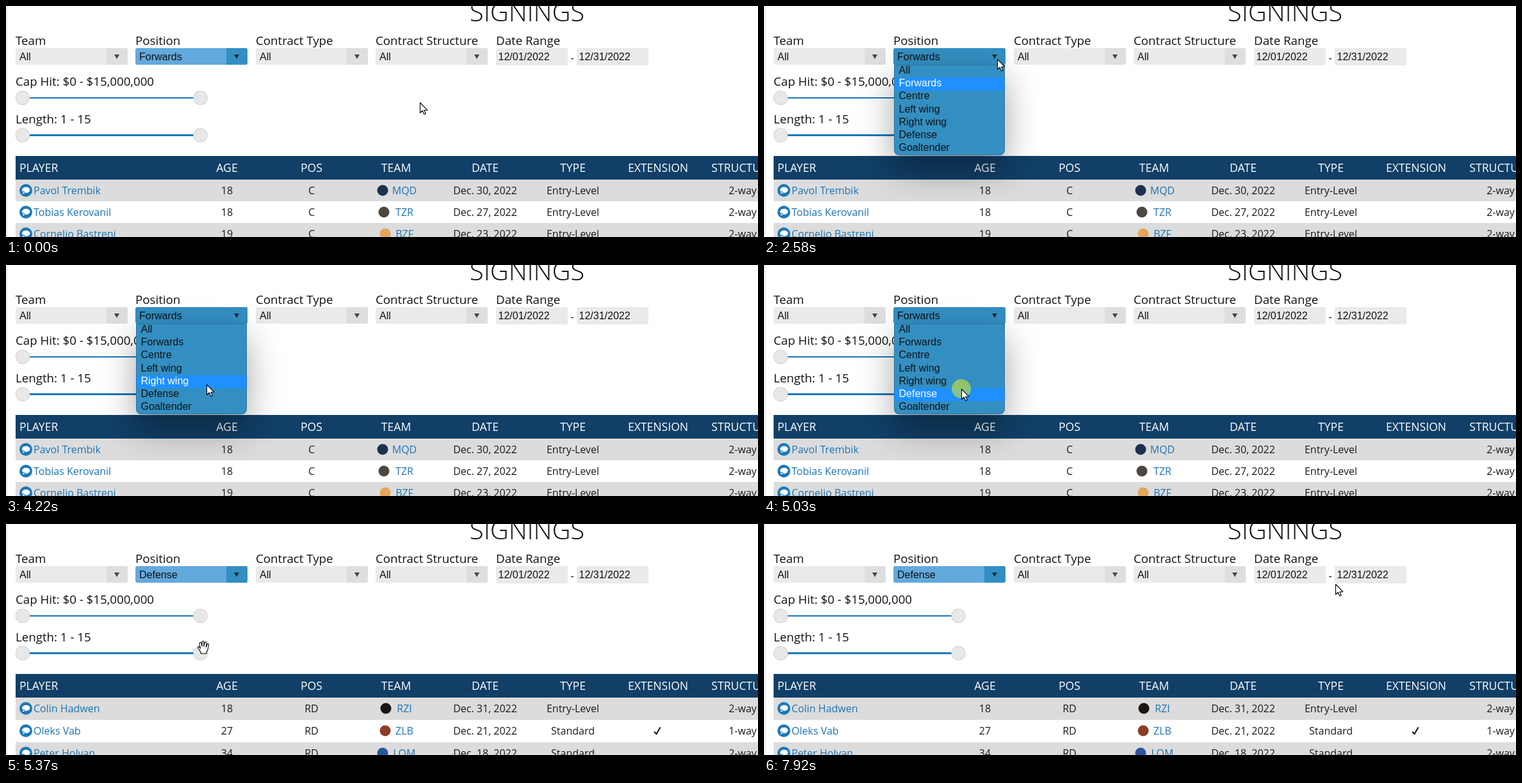
An HTML page with a canvas that plays this animation: 1174 by 362 pixels, repeating every 8 s.

```html
<!DOCTYPE html>
<html lang="en">
<head>
<meta charset="utf-8">
<title>Signings</title>
<style>
  html, body { margin: 0; width: 100%; height: 100%; overflow: hidden; background: #fff; }
  canvas { display: block; }
</style>
</head>
<body>
<canvas id="stage" width="1174" height="362"></canvas>
<script>
const ctx = document.getElementById('stage').getContext('2d');
const W = 1174, H = 362, LOOP = 8000;
const SANS = '"Open Sans", sans-serif';
const FORM = '16px "Liberation Sans", Arial, sans-serif';
const LABEL = '18.72px ' + SANS;
const CELL = '16px ' + SANS;
const HEAD = '17.6px ' + SANS;
const BLUE = '#1b78b8', LINK = '#1c74b3', INK = '#111';

const OPEN = 1920, REPAINT = 2580, PRESS = 5030, CLOSE = 5170, LOADED = 5310, LEAVE = 5900;
const OPTIONS = ['All', 'Forwards', 'Centre', 'Left wing', 'Right wing', 'Defense', 'Goaltender'];
const HOVERS = [[OPEN, 1], [3050, 0], [3530, 1], [3670, 2], [3810, 3], [4010, 4], [4420, 5]];

const COLUMNS = [['AGE', 345], ['POS', 477], ['TEAM', 609], ['DATE', 748],
  ['TYPE', 885], ['EXTENSION', 1018], ['STRUCTURE', 1150]];

const player = (name, age, pos, team, color, logoX, date, type, way, extended) =>
  ({ name, age, pos, team, color, logoX, date, type, way, extended });

const FORWARDS = [
  player('Pavol Trembik', '18', 'C', 'MQD', '#1d3050', 588, 'Dec. 30, 2022', 'Entry-Level', '2-way'),
  player('Tobias Kerovanil', '18', 'C', 'TZR', '#4d4740', 590, 'Dec. 27, 2022', 'Entry-Level', '2-way'),
  player('Cornelio Bastreni', '19', 'C', 'BZF', '#e5a55a', 592, 'Dec. 23, 2022', 'Entry-Level', '2-way')
];
const DEFENSE = [
  player('Colin Hadwen', '18', 'RD', 'RZI', '#1a1614', 593, 'Dec. 31, 2022', 'Entry-Level', '2-way'),
  player('Oleks Vab', '27', 'RD', 'ZLB', '#8c3d25', 592, 'Dec. 21, 2022', 'Standard', '1-way', true),
  player('Peter Holvan', '34', 'RD', 'LQM', '#29589b', 588, 'Dec. 18, 2022', 'Standard', '2-way')
];

const easeIn = p => u => u ** p;
const easeOut = p => u => 1 - (1 - u) ** p;
// Each move: start, end, steps, target x, target y, easing, optional easing for y.
const START = [646, 151];
const MOVES = [
  [330, 1090, 12, 440, 129, easeIn(1.4)],
  [1160, 1580, 7, 364, 84, easeOut(2)],
  [1650, 1650, 1, 364, 83, easeIn(1)],
  [2980, 3740, 12, 335, 153, easeIn(0.9)],
  [3810, 4220, 7, 313, 187, easeIn(0.6)],
  [4290, 4560, 4, 308, 193, easeOut(1.5)],
  [4630, 4630, 1, 308, 194, easeIn(1)],
  [5900, 6670, 12, 638, 172, easeIn(1.56), easeIn(6)],
  [6740, 7510, 12, 881, 101, easeOut(2)],
  [7580, 7720, 3, 892, 95, easeOut(1.5)],
  [7920, 7920, 1, 892, 94, easeIn(1)]
];

function pointer(t) {
  let [x, y] = START;
  for (const [start, end, steps, toX, toY, ease, easeY = ease] of MOVES) {
    if (t < start) break;
    const done = end > start ? Math.floor((t - start) / (end - start) * (steps - 1) + 0.01) + 1 : steps;
    const u = Math.min(1, done / steps);
    x += (toX - x) * ease(u);
    y += (toY - y) * easeY(u);
  }
  return [Math.round(x), Math.round(y)];
}

const ramp = (t, a, b) => Math.min(1, Math.max(0, (t - a) / (b - a)));

function mix(a, b, u) {
  return `rgb(${a.map((v, i) => Math.round(v + (b[i] - v) * u)).join(',')})`;
}

function rect(x, y, w, h, color) {
  ctx.fillStyle = color;
  ctx.fillRect(x, y, w, h);
}

function rounded(x, y, w, h, radius, color) {
  ctx.beginPath();
  ctx.roundRect(x, y, w, h, radius);
  ctx.fillStyle = color;
  ctx.fill();
}

function disc(x, y, r, color) {
  ctx.beginPath();
  ctx.arc(x, y, r, 0, Math.PI * 2);
  ctx.fillStyle = color;
  ctx.fill();
}

function text(str, x, y, font, color = INK, align = 'left') {
  ctx.font = font;
  ctx.textAlign = align;
  ctx.fillStyle = color;
  ctx.fillText(str, x, y);
}

function select(x, label, value, color = '#eaeaea', button = '#dedede', arrow = '#444') {
  text(label, x, 61, LABEL);
  rounded(x, 66, 175, 26, 3, color);
  rounded(x + 142, 66, 33, 26, [0, 3, 3, 0], button);
  text(value, x + 6, 85, FORM);
  ctx.beginPath();
  ctx.moveTo(x + 154, 76);
  ctx.lineTo(x + 162, 76);
  ctx.lineTo(x + 158, 83);
  ctx.fillStyle = arrow;
  ctx.fill();
}

function dateBox(x, value) {
  rounded(x, 66, 112, 27, 3, '#eaeaea');
  text(value, x + 3.5, 85, FORM);
}

function slider(label, baseline, y, weight) {
  text(label, 15, baseline, LABEL);
  rect(36, y - weight / 2, 258, weight, BLUE);
  for (const x of [26, 303.5]) {
    disc(x, y, 11.2, '#d3d3d3');
    disc(x, y, 10.2, '#e8e8e8');
  }
}

function filters(t) {
  const hover = t < 3000 ? ramp(t, 1440, 1720) : 1 - ramp(t, 5130, 5370);
  const fill = mix([98, 169, 221], [51, 143, 194], hover);
  select(15, 'Team', 'All');
  select(202, 'Position', t < CLOSE ? 'Forwards' : 'Defense', fill, '#338fc2', '#12303f');
  select(390, 'Contract Type', 'All');
  select(577, 'Contract Structure', 'All');
  text('Date Range', 765, 61, LABEL);
  dateBox(765, '12/01/2022');
  text('-', 884, 87, CELL, INK, 'center');
  dateBox(891, '12/31/2022');
  slider('Cap Hit: $0 - $15,000,000', 125, 144, 2);
  slider('Length: 1 - 15', 184, 202.5, 3);
}

function bubble(x, y) {
  disc(x, y, 10, BLUE);
  ctx.beginPath();
  ctx.ellipse(x + 0.3, y - 0.7, 6.2, 4.6, 0, 0, Math.PI * 2);
  ctx.moveTo(x - 4, y + 1);
  ctx.lineTo(x - 5, y + 5.5);
  ctx.lineTo(x, y + 3.5);
  ctx.fillStyle = '#fff';
  ctx.fill();
}

function check(x, y) {
  ctx.beginPath();
  ctx.moveTo(x - 5, y + 1.5);
  ctx.lineTo(x - 1.5, y + 5);
  ctx.lineTo(x + 4.5, y - 5.5);
  ctx.strokeStyle = INK;
  ctx.lineWidth = 2;
  ctx.stroke();
}

function rows(list, pitch) {
  list.forEach((p, i) => {
    const top = 272 + i * pitch, mid = 289 + i * pitch, base = mid + 6;
    if (i % 2 === 0) rect(15, top, W - 15, pitch, '#dcdcdc');
    const cell = (str, x) => text(str, x, base, CELL, '#1a1a1a', 'center');
    bubble(31, mid);
    text(p.name, 43, base, CELL, LINK);
    cell(p.age, 345);
    cell(p.pos, 477);
    disc(p.logoX, mid, 8.5, p.color);
    text(p.team, 622, base, CELL, LINK, 'center');
    cell(p.date, 748);
    cell(p.type, 885);
    if (p.extended) check(1017, mid);
    cell(p.way, 1150);
  });
}

function table(t) {
  rect(15, 235, W - 15, 37, '#113f67');
  text('PLAYER', 21, 260, HEAD, '#fff');
  for (const [name, x] of COLUMNS) text(name, x, 260, HEAD, '#fff', 'center');
  if (t < CLOSE) rows(FORWARDS, 34);
  else if (t >= LOADED) rows(DEFENSE, 35);
  else {
    rect(15, 297, W - 15, 1, '#dddddd');
    ctx.beginPath();
    ctx.arc(815, 382, 23, 0, Math.PI * 2);
    ctx.strokeStyle = '#c9c2bb';
    ctx.lineWidth = 4;
    ctx.stroke();
  }
}

function menu(t) {
  const x = 203, y = 92, w = 173, h = 142, pitch = 20.2;
  const fill = t < REPAINT ? '#3d95c9' : '#338fc2';
  const active = HOVERS.filter(([at]) => t >= at).pop()[1];
  ctx.save();
  ctx.shadowColor = 'rgba(0,0,0,0.36)';
  ctx.shadowBlur = 54;
  ctx.shadowOffsetY = 22;
  rounded(x, y, w, h, [0, 0, 8, 8], fill);
  ctx.restore();
  rect(x, y + active * pitch, w, pitch, '#1e90ff');
  OPTIONS.forEach((name, i) =>
    text(name, 210.5, 106 + i * pitch, FORM, i === active ? '#fff' : INK));
  ctx.beginPath();
  ctx.roundRect(x + 0.5, y + 0.5, w - 1, h - 1, [0, 0, 8, 8]);
  ctx.strokeStyle = 'rgba(40,80,110,0.45)';
  ctx.lineWidth = 1;
  ctx.stroke();
}

function outline(path) {
  ctx.fillStyle = '#fff';
  ctx.strokeStyle = '#000';
  ctx.lineWidth = 1.1;
  ctx.lineJoin = 'round';
  ctx.fill(path);
  ctx.stroke(path);
}

const ARROW = new Path2D('M.5.5V16.5L4.2 13 6.7 18.8 9.2 17.8 6.8 12.2H11.8Z');
const HAND = new Path2D('M-4 9V7C-5 4-9 1-8.5-1C-8-3-5.5-1-4.5 1L-6-6' +
  'C-6.5-9-3.5-9.5-3-7L-2-2V-9C-2-11 1-11 1-9V-2L2.3-8C3-10 5.5-9.5 5-7' +
  'L4.3-1 6-5C7-7 9-6 8.3-4L7 3 5 7V9Z');

function cursor(t) {
  const [x, y] = pointer(t);
  if (t >= PRESS && t < CLOSE) disc(x, y, 15, 'rgba(255,255,0,0.47)');
  ctx.save();
  ctx.translate(x, y);
  outline(t >= CLOSE && t < LEAVE + 70 ? HAND : ARROW);
  ctx.restore();
}

function draw(t) {
  rect(0, 0, W, H, '#fff');
  rect(1, 0, 1, H, '#dddddd');
  text('SIGNINGS', 813.5, 24, '300 40px ' + SANS, INK, 'center');
  filters(t);
  table(t);
  if (t >= OPEN && t < CLOSE) menu(t);
  cursor(t);
}

const began = performance.now();
function tick() {
  draw((performance.now() - began) % LOOP);
  requestAnimationFrame(tick);
}
tick();
</script>
</body>
</html>
```
